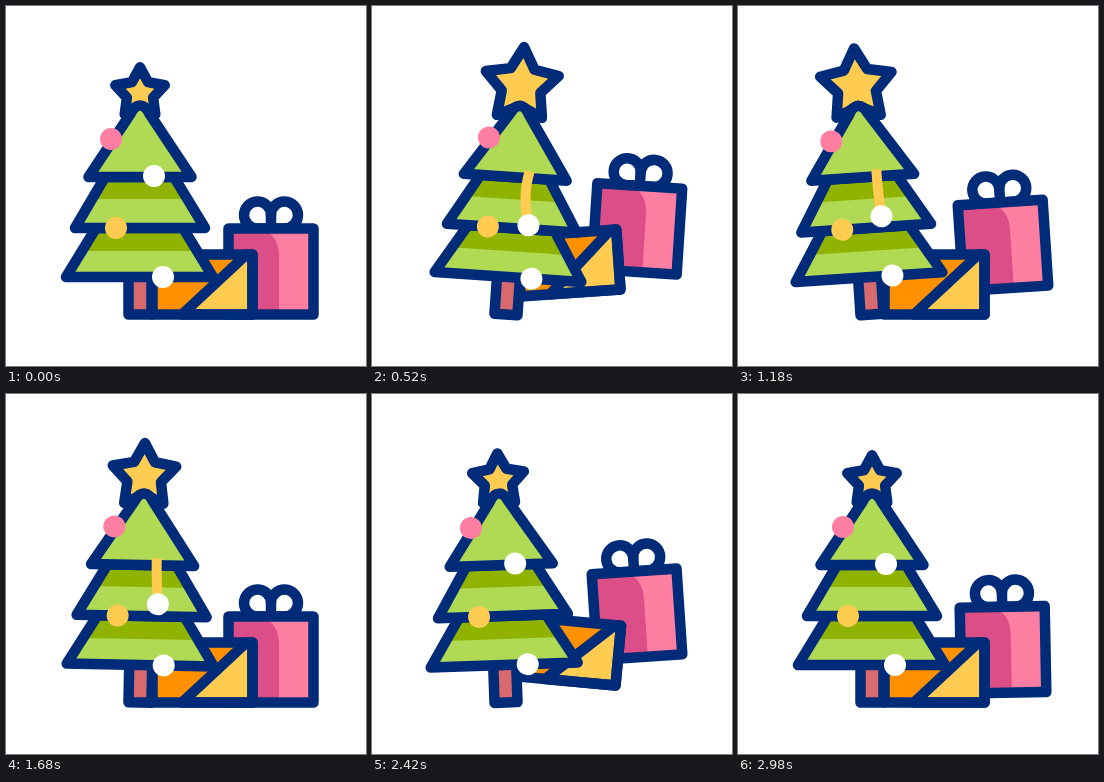
These frames come from a looping animation (360 by 360 pixels, 3 s). An HTML page:

```html
<!DOCTYPE html>
<html lang="en">
<head>
<meta charset="utf-8">
<title>Christmas tree and gifts</title>
<style>
  html, body { margin: 0; width: 100%; height: 100%; overflow: hidden; background: #fff; }
  svg { display: block; width: 100%; height: 100%; }
  .line { stroke: #002b78; stroke-width: 10.5; stroke-linejoin: round; stroke-linecap: round; }
  .leaf { fill: #b0d954; }
  .shade { fill: #8fb300; }
  .gold { fill: #ffcb50; }
  .pink { fill: #ff7fa2; }
  .none { fill: none; }
  .white { fill: #fff; }
</style>
</head>
<body>
<svg viewBox="0 0 360 360">
  <g id="tallGift">
    <path class="line white" d="M265 222.5H252A13.5 13.5 0 1 1 265 208.5A13.5 13.5 0 1 1 278 222.5Z"/>
    <path class="line none" d="M265 208.5V222.5"/>
    <path class="pink" d="M222.5 222.5H307.5V308.5H222.5Z"/>
    <path fill="#dc4e87" d="M222.5 222.5H256Q273 230 273 250V308.5H222.5Z"/>
    <path class="line none" d="M222.5 222.5H307.5V308.5H222.5Z"/>
  </g>
  <g id="wideGift">
    <path fill="#ff9000" d="M146.5 248.5H246.5V308.5H146.5Z"/>
    <path class="line gold" d="M176 308.5L240.5 248.5H246.5V308.5Z"/>
    <path class="line none" d="M146.5 248.5H246.5V308.5H146.5Z"/>
  </g>
  <g id="tree">
    <path class="line" fill="#d8696f" d="M122.5 265H145.5V308.5H122.5Z"/>
    <path id="star" class="line gold"/>
    <path class="leaf" d="M60 271L90 222H177L207 271Z"/>
    <path class="shade" d="M76 245L90 222H177L191 245Z"/>
    <path class="line none" d="M60 271L90 222H177L207 271Z"/>
    <path class="leaf" d="M69 222L99 171H168L199 222Z"/>
    <path class="shade" d="M86 193L99 171H168L181.4 193Z"/>
    <path class="line none" d="M69 222L99 171H168L199 222Z"/>
    <path class="line leaf" d="M82.5 171L125 107C130 97 138 97 143 107L185.5 171Z"/>
    <path id="string" fill="none" stroke="#ffcb50" stroke-width="10"/>
    <circle class="pink" cx="105" cy="133" r="11"/>
    <circle class="gold" cx="110" cy="222" r="11"/>
    <circle class="white" cx="157" cy="271" r="11"/>
    <circle id="bauble" class="white" r="11"/>
  </g>
</svg>
<script>
const LOOP = 3000, HOP_START = 90, HOP_PERIOD = 1600;
const part = id => document.getElementById(id);
const tree = part('tree'), star = part('star'), string = part('string');
const bauble = part('bauble'), tallGift = part('tallGift'), wideGift = part('wideGift');

// Each track is a list of [time, value] keys joined by sine easing.
const SWAY = [[0, 0], [500, 3.9], [1110, -4], [1820, 1.6], [2440, -2], [2960, 0]];
const STAR_SCALE = [[0, 1], [640, 1.52], [2840, 1]];
const DROP = [[60, 0], [500, 48], [1000, 42], [1400, 40], [1670, 40], [2050, 0]];
const TALL_TURN = [[60, 0], [380, 4], [800, -4.4], [1000, -4.2], [1440, 0]];
const WIDE_RISE = [[40, 0], [340, 21.5], [740, 21.5], [1060, 0]];

function sample(keys, t) {
  if (t <= keys[0][0]) return keys[0][1];
  const i = keys.findIndex(key => key[0] > t);
  if (i < 0) return keys[keys.length - 1][1];
  const [t0, a] = keys[i - 1], [t1, b] = keys[i];
  return a + (b - a) * (1 - Math.cos(Math.PI * (t - t0) / (t1 - t0))) / 2;
}

// Quick launch, slow at the top, then a longer fall.
function tallRise(phase) {
  const takeoff = 105, peak = 565, landing = 1400;
  const u = phase < peak ? (phase - takeoff) / (peak - takeoff) : (landing - phase) / (landing - peak);
  return 47.5 * Math.sin(Math.max(0, u) * Math.PI / 2);
}

function starPath(scale) {
  const radius = 26 * scale, cy = 105 - 17.7 * scale;
  const points = Array.from({ length: 10 }, (_, i) => {
    const r = i % 2 ? radius * 0.53 : radius, a = i * Math.PI / 5;
    return `${134 + r * Math.sin(a)} ${cy - r * Math.cos(a)}`;
  });
  return `M${points.join('L')}Z`;
}

function pose(node, rise, turn, x, y) {
  node.setAttribute('transform', `translate(0 ${-rise}) rotate(${turn} ${x} ${y})`);
}

function render(t) {
  pose(tree, 0, sample(SWAY, t), 134, 308);
  star.setAttribute('d', starPath(sample(STAR_SCALE, t)));

  const drop = sample(DROP, t);
  const x = 148 + drop / 20, y = 170 + drop;
  const bend = Math.max(0, drop - 42);
  bauble.setAttribute('cx', x);
  bauble.setAttribute('cy', y);
  string.setAttribute('d', drop > 1 ? `M148 164Q${148 - bend} ${165 + drop / 2} ${x} ${y}` : '');

  const elapsed = Math.max(0, t - HOP_START);
  const phase = elapsed % HOP_PERIOD;
  const rise = sample(WIDE_RISE, phase);
  const lean = elapsed < HOP_PERIOD ? -4 : 5.3;
  pose(tallGift, tallRise(phase), sample(TALL_TURN, phase), 265, 265.5);
  pose(wideGift, rise, lean * rise / 21.5, 196.5, 278.5);
}

const start = performance.now();
function tick() {
  render((performance.now() - start) % LOOP);
  requestAnimationFrame(tick);
}
tick();
</script>
</body>
</html>
```
